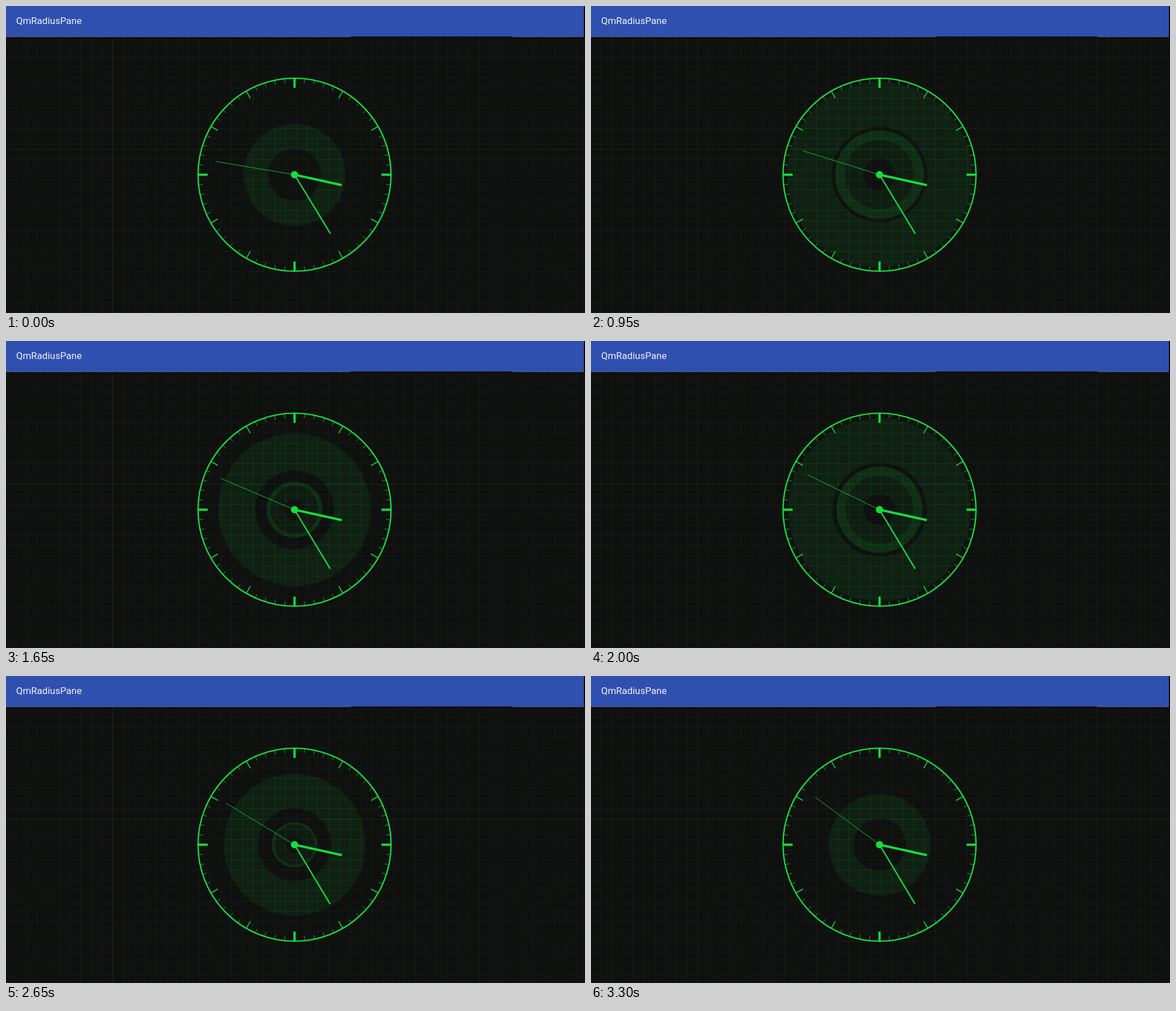
Write an HTML page with a canvas that moves like this. It is 1028 px wide and 545 px high and loops after 3.35 s.

```html
<!DOCTYPE html>
<html lang="en">
<head>
<meta charset="utf-8">
<title>Radar clock</title>
<style>
  html, body { margin: 0; width: 100%; height: 100%; overflow: hidden; background: #101010; }
  canvas { position: absolute; left: 0; top: 0; }
  header {
    position: absolute; left: 0; top: 0; width: 1008px; height: 54px; padding-left: 18px;
    background: #2f50af; color: #f0f2fa; font: 17px/53px Roboto, sans-serif;
  }
</style>
</head>
<body>
<canvas width="1028" height="545"></canvas>
<header>QmRadiusPane</header>
<script>
const ctx = document.querySelector('canvas').getContext('2d');
const W = 1028, H = 545, CX = 512.3, CY = 299.5, DIAL = 171.4;
const LOOP = 3350, STEP = 50, RIPPLE_GAP = 85.75;
const green = (alpha = 1) => `rgba(20, 222, 62, ${alpha})`;
const radians = degrees => degrees * Math.PI / 180;

// Outer radius of the leading ripple, [ms, px]; it restarts with each sweep.
const sweeps = [
  [[0, 90.5], [500, 134], [950, 164.6]],
  [[1000, 89], [1650, 135.5], [2050, 166]],
  [[2100, 87], [2650, 126], [3250, 169]],
  [[3300, 90.5]]
];

function rippleRadius(time) {
  const keys = sweeps.findLast(sweep => sweep[0][0] <= time);
  const next = keys.findIndex(key => key[0] >= time);
  if (next <= 0) return keys[0][1];
  const [t0, r0] = keys[next - 1], [t1, r1] = keys[next];
  return r0 + (r1 - r0) * (time - t0) / (t1 - t0);
}

const grid = new Path2D();
const columns = new Path2D();
const majors = new Path2D();
for (let x = 17; x < W; x += 19.15) columns.rect(Math.round(x), 55, 1, H);
for (let y = 72.6; y < H; y += 18.15) grid.rect(0, Math.floor(y), W, 1);
majors.rect(189, 55, 1, H);
majors.rect(0, 254, W, 1);
grid.addPath(columns);

function drawBackground() {
  ctx.fillStyle = '#101010';
  ctx.fillRect(0, 0, W, H);
  ctx.fillStyle = green(0.075);
  ctx.fill(grid);
  ctx.fill(majors);
  ctx.fillStyle = '#56658f';
  ctx.fillRect(0, 54, 612, 1);
  ctx.fillRect(899, 54, 127, 1);
  ctx.fillStyle = '#000';
  ctx.fillRect(1026, 0, 2, 55);
}

function annulus(inner, outer, alpha) {
  const ring = new Path2D();
  ring.arc(CX, CY, outer, 0, 2 * Math.PI);
  ring.closePath();
  ring.moveTo(CX + inner, CY);
  ring.arc(CX, CY, inner, 0, 2 * Math.PI);
  ctx.fillStyle = green(alpha);
  ctx.fill(ring, 'evenodd');
  // Grid lines glow a little inside a ripple.
  ctx.save();
  ctx.clip(ring, 'evenodd');
  ctx.fillStyle = green(0.05);
  ctx.fill(grid);
  ctx.restore();
}

function drawRipples(time) {
  const outer = rippleRadius(time);
  annulus(outer * 0.515, outer, 0.075);
  const small = outer - RIPPLE_GAP;
  if (small < 6) return;
  const edge = small - small * small / 355;
  annulus(small * 0.36, edge, 0.025 + small * 0.0005);
  annulus(edge, small, 0.14);
}

function ray(degrees, from, to, width, alpha = 1) {
  const c = Math.cos(radians(degrees)), s = Math.sin(radians(degrees));
  ctx.beginPath();
  ctx.moveTo(CX + from * c, CY + from * s);
  ctx.lineTo(CX + to * c, CY + to * s);
  ctx.lineWidth = width;
  ctx.strokeStyle = green(alpha);
  ctx.stroke();
}

function drawDial() {
  ctx.beginPath();
  ctx.arc(CX, CY, DIAL, 0, 2 * Math.PI);
  ctx.lineWidth = 2.4;
  ctx.strokeStyle = green();
  ctx.stroke();
  for (let i = 0; i < 60; i++) {
    if (i % 15 === 0) ray(i * 6, 154.3, DIAL, 4);
    else if (i % 5 === 0) ray(i * 6, 157, DIAL, 1.6);
    else ray(i * 6, 163.5, DIAL, 1, 0.8);
  }
}

function drawHands(time) {
  const seconds = time / 1000;
  ray(12.4, 0, 86, 4);
  ray(58.65 + seconds * 0.136, 0, 122.5, 2.4);
  ray(189.55 + seconds * 8.17, 0, 142.3, 1, 0.85);
  ctx.beginPath();
  ctx.arc(CX, CY, 6.5, 0, 2 * Math.PI);
  ctx.fillStyle = green();
  ctx.fill();
}

const start = performance.now();
function draw() {
  const elapsed = Math.max(0, performance.now() - start) % LOOP;
  const time = Math.floor(elapsed / STEP) * STEP;
  drawBackground();
  drawRipples(time);
  drawDial();
  drawHands(time);
  requestAnimationFrame(draw);
}
draw();
</script>
</body>
</html>
```
